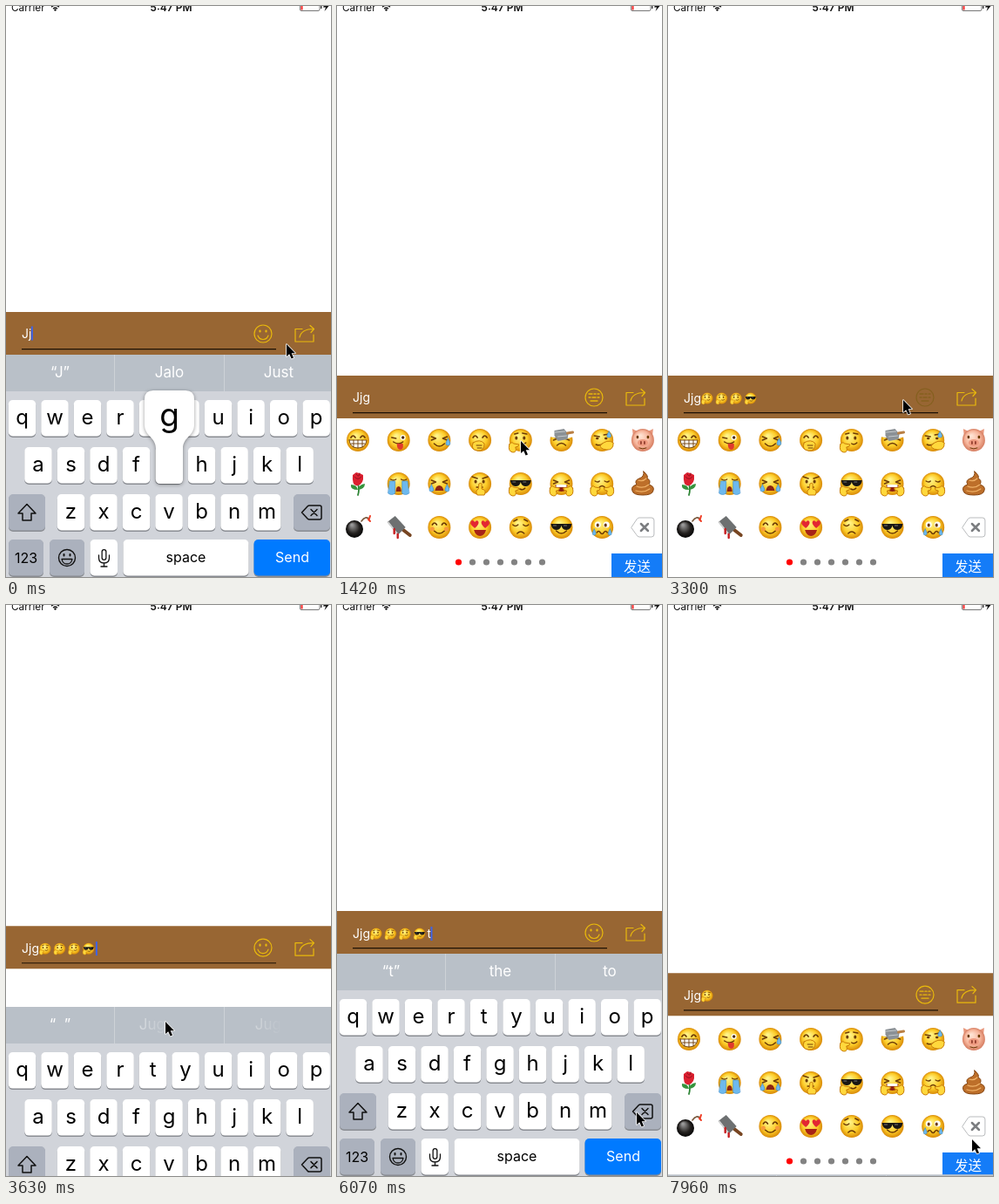
Animation, 373 px wide and 655 px high, one loop 8 s. Source, as an HTML page with a canvas:

```html
<!DOCTYPE html>
<html lang="en">
<head>
<meta charset="utf-8">
<title>Chat input bar</title>
<style>
html, body { margin: 0; width: 373px; height: 655px; overflow: hidden; background: #fff; }
canvas { display: block; width: 373px; height: 655px; }
</style>
</head>
<body>
<canvas></canvas>
<script>
const W = 373, H = 655, LOOP = 8000;
const canvas = document.querySelector('canvas');
const ctx = canvas.getContext('2d');
const dpr = window.devicePixelRatio || 1;
canvas.width = W * dpr;
canvas.height = H * dpr;

// The screen refreshes only at these moments.
const TICKS = [0, 180, 480, 650, 810, 970, 1130, 1280, 1420, 1630, 1780, 1930, 2090, 2240, 2400, 2550,
  2700, 2850, 3000, 3300, 3450, 3630, 3830, 4040, 4250, 4460, 4640, 4800, 4960, 5120, 5280, 5440,
  5680, 5870, 6070, 6250, 6440, 6630, 6780, 6930, 7080, 7230, 7370, 7520, 7670, 7820, 7960];

// Tracks: [time, value...]
const POINTER = [[0, 322, 388], [180, 302, 374], [480, 297, 376], [700, 296, 377], [1130, 215, 490],
  [1420, 211, 499], [1930, 211, 500], [2090, 211, 538], [2240, 213, 537], [2400, 258, 482],
  [2550, 274, 471], [2700, 289, 452], [3000, 295, 440], [3300, 270, 452], [3630, 183, 478],
  [3830, 169, 473], [4040, 169, 474], [4250, 192, 498], [4460, 254, 546], [4640, 310, 578],
  [4960, 343, 588], [5680, 344, 582], [6780, 344, 582], [7080, 300, 390], [7230, 295, 375],
  [7370, 296, 376], [7820, 349, 608], [7960, 349, 613]];
const DROP = [[0, 0], [1280, .975], [1420, 1], [3630, .235], [3830, .02], [4040, 0], [7960, .975]];
const TYPED = [[0, 'Jj', 0], [480, 'Jjg', 0], [1780, 'Jjg', 1], [1930, 'Jjg', 2], [2090, 'Jjg', 3],
  [2400, 'Jjg', 4], [4460, 'Jjg', 4, 't'], [6250, 'Jjg', 4], [6630, 'Jjg', 3], [6930, 'Jjg', 2], [7230, 'Jjg', 1]];
const HINTS = [[0, '“J”', 'Jalo', 'Just'], [180, '“Jj”', '', ''], [480, '“Jjg”', 'Juggling', 'Juggle'],
  [3830, '“”', '', ''], [4640, '“t”', 'the', 'to'], [6250, '“”', '', '']];

const stepAt = (track, t) => track.findLast(k => k[0] <= t);
const during = (t, ...spans) => spans.some(([a, b]) => t >= a && t < b);

function pointerAt(t) {
  const i = POINTER.findLastIndex(k => k[0] <= t);
  const a = POINTER[i], b = POINTER[i + 1] || a;
  const p = b === a ? 0 : (t - a[0]) / (b[0] - a[0]);
  return [a[1] + (b[1] - a[1]) * p, a[2] + (b[2] - a[2]) * p];
}

// Drawing helpers
function rect(x, y, w, h, color, r = 0) {
  ctx.fillStyle = color;
  ctx.beginPath();
  ctx.roundRect(x, y, w, h, r);
  ctx.fill();
}
function disc(x, y, r, color) {
  ctx.fillStyle = color;
  ctx.beginPath();
  ctx.arc(x, y, r, 0, 7);
  ctx.fill();
}
function fill(d, color) {
  ctx.fillStyle = color;
  ctx.fill(new Path2D(d));
}
function line(d, width = 1.5, color = '#6b3a06') {
  ctx.strokeStyle = color;
  ctx.lineWidth = width;
  ctx.lineCap = ctx.lineJoin = 'round';
  ctx.stroke(new Path2D(d));
}
function text(s, x, y, size, color, align = 'center', weight = 400) {
  ctx.font = `${weight} ${size}px Inter, "Noto Sans CJK SC", sans-serif`;
  ctx.textAlign = align;
  ctx.fillStyle = color;
  ctx.fillText(s, x, y);
}
function place(x, y, draw, scale = 1) {
  ctx.save();
  ctx.translate(x, y);
  ctx.scale(scale, scale);
  draw();
  ctx.restore();
}

// Emoji, drawn around the origin in a 28 px box
function ball(inner, mid, outer, r = 13) {
  const g = ctx.createRadialGradient(-3, -5, 1, 0, 0, r);
  g.addColorStop(0, inner);
  g.addColorStop(.65, mid);
  g.addColorStop(1, outer);
  disc(0, 0, r, g);
}
const face = () => ball('#fff48a', '#fcca26', '#d88a08');
const dots = () => line('M-5-3v1M4-3v1', 3);
const happyEyes = () => line('M-8-3q2.500-4 5 0M3-3q2.500-4 5 0', 1.7);
const shutEyes = () => line('M-9-4l5 2-5 2M9-4l-5 2 5 2', 1.6);
const smile = () => line('M-6 4q6 6 12 0');
const frown = () => line('M-4 7q4-4 8 0');
function hand(d) {
  fill(d, '#ffd83c');
  line(d, 1, '#c87c08');
}
function shades() {
  fill('M-12-4H12Q11 3 6 3T0-2Q-1 3-6 3T-12-4Z', '#191714');
  line('M-9-2l3 0M3-2l3 0', 1, '#777');
}
function tears(d) {
  fill(d, '#6db9ee');
  line(d, .6, '#3b8ccc');
}
const LEFT_HAND = 'M-13 5q2-4 5-1l6 1q0 3-4 3q2 6-3 6q-6-1-4-9Z';
const BOTH_HANDS = LEFT_HAND + 'M13 5q-2-4-5-1l-6 1q0 3 4 3q-2 6 3 6q6-1 4-9Z';

const ART = {
  grin() {
    face(); happyEyes();
    fill('M-10 0H10Q9 9 0 9T-10 0Z', '#fff');
    line('M-10 0H10Q9 9 0 9T-10 0ZM-5 0V8M0 0V9M5 0V8M-8 4H8', .9);
  },
  tongue() {
    face(); line('M-8-3l5 1M-6 2q6 4 11 0');
    disc(5, -3, 3, '#fff'); disc(5, -3, 1.700, '#4a2800');
    fill('M-2 4h7q1 7-3 7t-4-7Z', '#e03a2c');
  },
  sweat() { face(); shutEyes(); smile(); tears('M10-2q5 8 0 8t0-8Z'); },
  giggle() { face(); happyEyes(); hand('M-8 3q8-5 13 1q0 9-8 8t-5-9Z'); line('M-4 6h6M-3 9h5', 1); },
  think() { face(); dots(); line('M-7-7l4-1M2-8l5 1M0 4q3 2 6-1'); hand(LEFT_HAND); },
  hammer() {
    face(); shutEyes(); line('M-5 6q5-5 10 0');
    fill('M-14-14H14V-4L4-1-14-4Z', '#fff');
    fill('M-8-11l11-2 5 6-1 6-11 2-4-6Z', '#8b9196');
    line('M-7-9l11-1M-4-4l10-1', 1, '#c5cacc');
    line('M7-8l6-1', 3, '#b98045');
  },
  phew() {
    face(); line('M-9-5l6 1M2-6l6-1'); line('M-6-2h1M4-2h1', 2.400);
    line('M-7 5q4 2 8-1'); tears('M8-10q5 7 0 7t0-7Z'); hand('M-2 6q8-8 15-3q0 9-8 8t-7-5Z');
  },
  pig() {
    fill('M-11-4l-1-9 8 4ZM11-4l1-9-8 4Z', '#e8977c');
    ball('#ffe3d3', '#f6b49a', '#d67e62');
    line('M-6-4v1M6-4v1', 2.600);
    ctx.beginPath(); ctx.ellipse(0, 3, 6, 4, 0, 0, 7); ctx.fillStyle = '#ee9a80'; ctx.fill();
    line('M-2 2v2M2 2v2', 1.800, '#943f2f'); line('M-4 9q4 2 8 0', 1);
  },
  rose() {
    line('M0 0Q2 7 0 13', 1.800, '#2c8434');
    fill('M0 7Q-9 7-8 1Q-1 1 0 7Q8 6 8 0Q1 1 0 7Z', '#36933d');
    fill('M-6-10L-2-13 2-12 6-10Q7 0 0 2T-6-10Z', '#dc2030');
    line('M-4-8q4 5 8 0M-2-11q4 5 4-1', 1, '#94101f');
  },
  cry() {
    face(); line('M-9-5q3 2 6 0M3-5q3 2 6 0');
    tears('M-10-3h6v14q-4 3-8 0ZM10-3h-6v14q4 3 8 0Z'); fill('M-3 9q0-6 3-6t3 6Z', '#8d2512');
  },
  sob() { face(); shutEyes(); fill('M-5 8q1-6 5-6t5 6Z', '#8d2512'); tears('M-9 1q-5 8 0 8t0-8ZM9 1q5 8 0 8t0-8Z'); },
  hush() { face(); dots(); line('M-9-8l6 2M9-8l-6 2M-4 4h7'); hand('M-1 0q3-2 3 1v5q6 1 3 7h-8q-3-5 1-7Z'); },
  cool() { face(); shades(); line('M-1 6q4 2 6-1'); hand(LEFT_HAND); },
  laugh() {
    face(); shutEyes(); fill('M-7 1H7Q7 9 0 9T-7 1Z', '#8d1f12'); fill('M-6 1H6V4H-6Z', '#fff'); hand(BOTH_HANDS);
  },
  plead() { face(); line('M-8-3q3 2 5 0M3-3q3 2 5 0'); line('M-3 4q3-3 6 0'); hand(BOTH_HANDS); },
  poop() {
    const d = 'M1-14Q7-9 5-6Q10-4 7 1Q14 3 12 8Q11 13 0 13T-12 8Q-14 3-7 1Q-10-4-4-6Q2-8 1-14Z';
    fill(d, '#bd6f2a'); line(d, 1, '#84430f');
    line('M-5-4q5 2 9-2M-7 3q8 3 14-2M-8 8q9 3 16-2', 1.200, '#f0b268');
  },
  bomb() {
    line('M4-7Q9-14 13-9', 1.600, '#76563a'); line('M12-9l2 2M13-10l1-3', 2, '#ee3b23');
    place(-4, 2, () => ball('#999', '#24211f', '#050505', 10));
  },
  cleaver() {
    line('M4 2l9 7', 4, '#774521');
    fill('M-13-6L-4-13 8 0-1 9Z', '#6d7071');
    line('M-12-6L-1 8', 1.500, '#d5d5d5'); line('M-5 2v5M-1 8v4', 2.400, '#c61d20');
  },
  blush() { face(); happyEyes(); smile(); disc(-8, 2, 2.500, '#f79a3b'); disc(8, 2, 2.500, '#f79a3b'); },
  love() {
    face();
    fill('M-6 1Q-14-5-9-8-7-8-6-6-4-9-2-7 0-4-6 1ZM6 1Q14-5 9-8 7-8 6-6 4-9 2-7 0-4 6 1Z', '#e32632');
    fill('M-7 3H7Q5 10 0 10T-7 3Z', '#a72316');
  },
  weary() { face(); line('M-9-3q3 3 6 0M3-3q3 3 6 0M-8-7l4-2M8-7l-4-2'); frown(); },
  dude() { face(); shades(); smile(); },
  worry() {
    face(); disc(-5, -3, 3.500, '#fff'); disc(5, -3, 3.500, '#fff'); dots();
    line('M-6 6q2-3 4 0t4 0 4 0'); tears('M-9 2q-4 7 0 7t0-7ZM9 2q4 7 0 7t0-7Z');
  },
  erase() {
    line('M-13 0L-7-9Q-6-11-4-11H10Q13-11 13-8V8Q13 11 10 11H-4Q-6 11-7 9Z', 1, '#b9bbbd');
    line('M-2-4l8 8M6-4l-8 8', 2.500, '#7b7d80');
  }
};
const GRID = ['grin tongue sweat giggle think hammer phew pig', 'rose cry sob hush cool laugh plead poop',
  'bomb cleaver blush love weary dude worry erase'].map(row => row.split(' '));

function emojiPanel() {
  GRID.forEach((row, j) => row.forEach((name, i) => place(24 + i * 46.700, 498 + j * 50, ART[name])));
  for (let i = 0; i < 7; i++) disc(139.500 + i * 16, 638, 3.600, i ? '#828282' : '#f00');
  rect(315, 628, 58, 27, '#147cf8');
  text('发送', 344.500, 649, 15.500, '#fff');
}

// Keyboard
function key(x, y, w, color = '#fff') {
  rect(x, y + 1, w, 42, '#898c92', 5);
  rect(x, y, w, 41.500, color, 5);
}
function hint(s, x, fading) {
  let color = '#fff';
  if (fading) {
    color = ctx.createLinearGradient(x - 36, 0, x + 4, 0);
    color.addColorStop(0, 'rgba(255,255,255,.45)');
    color.addColorStop(1, 'rgba(255,255,255,0)');
  }
  text(s, x, 425.500, 17, color);
}
function popup() {
  const d = 'M169 441H206Q216 441 216 451V480C216 494 203 494 203 508V543Q203 548 198 548H177' +
    'Q172 548 172 543V508C172 494 159 494 159 480V451Q159 441 169 441Z';
  ctx.save();
  ctx.shadowColor = 'rgba(0,0,0,.4)';
  ctx.shadowBlur = 4;
  ctx.shadowOffsetY = 1;
  fill(d, '#fff');
  ctx.restore();
  text('g', 187.500, 482, 37, '#000');
}
function keyboard(t) {
  const GRAY = '#abb1bd';
  rect(0, 400, W, 260, '#d1d4da');
  rect(0, 400, W, 42, '#b9c0c8');
  rect(124, 400, 1, 42, '#cdd2d7');
  rect(250, 400, 1, 42, '#cdd2d7');
  const fading = during(t, [3450, 3830]);
  const [, left, middle, right] = stepAt(HINTS, t);
  hint(fading ? '“  ”' : left, 62);
  hint(middle, 187.500, fading);
  hint(right, 313, fading);

  [['qwertyuiop', 18.500], ['asdfghjkl', 37], ['zxcvbnm', 74.500]].forEach(([letters, x0], row) =>
    [...letters].forEach((c, i) => {
      const x = x0 + i * 37.520, y = 452 + row * 54;
      key(x - 15.750, y, 31.500);
      text(c, x, y + 27.500, 24, '#000');
    }));

  const pressed = during(t, [5870, 6070], [6440, 6630], [6780, 6930], [7080, 7230]);
  key(3, 560, 42, GRAY);
  key(330, 560, 42, pressed ? '#fff' : GRAY);
  line('M24 571.500L34 582H29V590H19V582H14Z', 1.500, '#111');
  line('M339.500 581L346 574Q347 573 348 573H360Q362 573 362 575V587Q362 589 360 589H348Q347 589 346 588Z', 1.500, '#111');
  line('M350 577.500l7 7M357 577.500l-7 7', 1.500, '#111');

  key(3, 612, 40, GRAY);
  key(50, 612, 40, GRAY);
  key(96.500, 612, 31.500);
  key(134.500, 612, 144);
  key(284.500, 612, 87.500, '#007aff');
  text('123', 23, 639, 16, '#000');
  text('space', 206.500, 638, 16, '#000');
  text('Send', 328.500, 638, 16, '#fff');
  place(70, 633, () => {
    line('M-9.500 0a9.500 9.500 0 1 0 19 0a9.500 9.500 0 1 0-19 0', 1.400, '#111');
    line('M-3.500-4v1.500M3.500-4v1.500', 2, '#111');
    line('M-6 1.500H6Q5 7 0 7T-6 1.500Z', 1.300, '#111');
  });
  rect(109.500, 623, 6, 13, '#111', 3);
  rect(110.800, 624.300, 3.400, 10.400, '#fff', 2);
  line('M106.500 630v3q0 6 6 6t6-6v-3M112.500 639v4M109 643h7', 1.300, '#111');
  if (during(t, [0, 480], [4460, 4640])) popup();
}

function inputBar(t, top, panelOpen) {
  const GOLD = '#e9b90c';
  rect(0, top, W, 49, '#986633');
  rect(18, top + 42, 292, 1.200, '#1c1005');
  const [, word, count, tail = ''] = stepAt(TYPED, t);
  const base = top + (count ? 31 : 29.500);
  text(word, 18, base, 14, '#fff', 'left');
  let end = 18 + ctx.measureText(word).width;
  for (let i = 0; i < count; i++) place(45 + i * 16.600, base - 5, ART[i < 3 ? 'think' : 'cool'], .5);
  if (count) end = 37 + count * 16.600;
  if (tail) {
    text(tail, end, base, 14, '#fff', 'left');
    end += ctx.measureText(tail).width;
  }
  if (!panelOpen) rect(end - .5, base - 13, 2, 16, '#3e63e6');

  const dim = during(t, [970, 1280], [3300, 3630], [7670, 7960]);
  place(295, top + 25, () => {
    const color = dim ? '#85601f' : GOLD;
    line('M-10 0a10 10 0 1 0 20 0a10 10 0 1 0-20 0', 1.200, color);
    if (panelOpen) {
      line('M-6-4h4M0-4h2M4-4h2M-6 0h2M-2 0h4M4 0h2M-4 4h8', 1.300, color);
    } else {
      line('M-3.500-3.500v1M3.500-3.500v1', 2.200, color);
      line('M-6 2q1.500 4.500 6 4.500T6 2', 1.200, color);
    }
  });
  place(331, top + 15, () => {
    line('M9 4.500H1V19H22V11', 1.200, GOLD);
    line('M6 14Q8 4.500 22 4.500M18 .5L22.500 4.500 19 8.500', 1.200, GOLD);
  });
}

function statusBar() {
  text('Carrier', 6, 5.500, 11.800, '#111', 'left');
  text('5:47 PM', 189.500, 5.500, 12, '#111', 'center', 600);
  line('M52.500 .8q4-3 8 0M54.500 2.800q2-1.500 4 0', 1.400, '#111');
  disc(56.500, 4.500, 1.200, '#111');
  line('M337.500-4V4Q337.500 5.500 339 5.500H358Q360 5.500 360 4V-4', .8, '#555');
  rect(338.500, -2, 2, 6.500, '#f22');
  rect(361, -1, 1.500, 4, '#444');
  fill('M366-3L364 1.500H367L365.500 6L370.500 0H367.500L369-3Z', '#111');
}

function draw(now) {
  const clock = now % LOOP;
  const t = TICKS.findLast(k => k <= clock);
  const drop = stepAt(DROP, t)[1];
  const panelOpen = during(t, [1280, 3630], [7960, LOOP]);
  ctx.setTransform(dpr, 0, 0, dpr, 0, 0);
  rect(0, 0, W, H, '#fff');
  statusBar();
  if (panelOpen) emojiPanel();
  if (drop < 1) place(0, drop * 260, () => keyboard(t));
  inputBar(t, 351 + drop * 73, panelOpen);
  place(...pointerAt(t), () => {
    const d = 'M0 0V14L3.200 11.200 5.600 16.500 8 15.500 5.700 10.300H10Z';
    line(d, 1.600, '#fff');
    fill(d, '#000');
  });
  requestAnimationFrame(draw);
}
requestAnimationFrame(draw);
</script>
</body>
</html>
```
